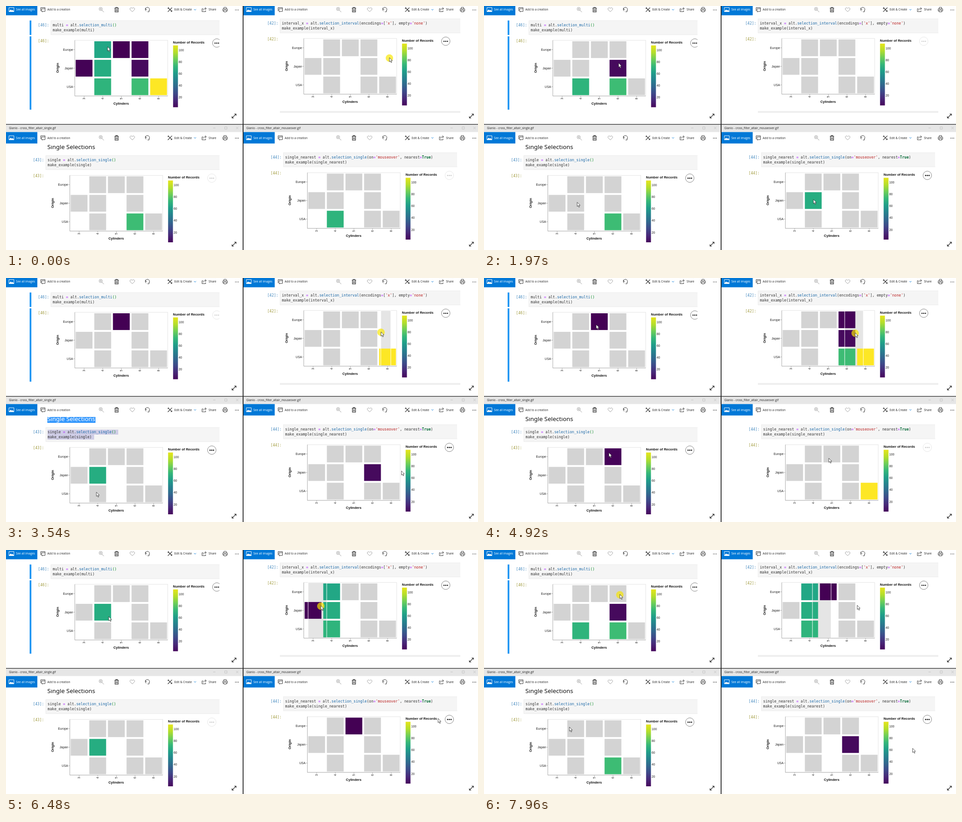
Write an HTML page that moves like this. It is 1039x539 px and loops after 8 s.

```html
<!DOCTYPE html>
<html lang="en">
<head>
<meta charset="utf-8">
<title>Chart selections</title>
<style>
html, body { margin: 0; width: 100%; height: 100%; overflow: hidden; background: #fff; }
svg { display: block; width: 1039px; height: 539px; }
text { white-space: pre; }
.ui { font: 6.35px "Open Sans", "Noto Sans", sans-serif; fill: #222; }
.code { font: 8.07px "DejaVu Sans Mono", monospace; fill: #333; }
.label { font: 6.8px "Liberation Sans", sans-serif; fill: #222; }
.name { font: bold 7.48px "Liberation Sans", sans-serif; fill: #111; }
.head { font: 13.4px "Noto Sans", "Open Sans", sans-serif; fill: #111; }
.icon { fill: none; stroke: #333; stroke-width: .95; }
.pale { stroke: #999; }
.axis { stroke: #999; stroke-width: .75; }
</style>
</head>
<body>
<svg id="stage" viewBox="0 0 1039 539">
  <defs>
    <linearGradient id="scale" x1="0" y1="1" x2="0" y2="0"></linearGradient>
    <clipPath id="pane"><rect width="470" height="260"/></clipPath>
    <clipPath id="page"><rect y="307" width="520" height="232"/></clipPath>
  </defs>
</svg>
<script>
const LOOP = 8000, STEP = 41, GREY = '#d3d3d3';
const stage = document.getElementById('stage');

function el(tag, attrs, parent = stage, content) {
  const node = document.createElementNS('http://www.w3.org/2000/svg', tag);
  for (const k in attrs) node.setAttribute(k, attrs[k]);
  if (content !== undefined) node.textContent = content;
  parent.appendChild(node);
  return node;
}
const rect = (x, y, width, height, fill, parent) => el('rect', { x, y, width, height, fill }, parent);
const text = (cls, x, y, str, parent, more) => el('text', { class: cls, x, y, ...more }, parent, str);
const icon = (d, parent, style = '', cls = 'icon') => el('path', { class: cls, d, style }, parent);
const dots = (x, y, gap, r, parent) =>
  [-gap, 0, gap].forEach(dx => el('circle', { cx: x + dx, cy: y, r, fill: '#111' }, parent));

'#46085c #482878 #3e4989 #31688e #26828e #1f9e89 #35b779 #6ece58 #b5de2b #e6e41c'.split(' ')
  .forEach((c, i) => el('stop', { offset: i / 9, 'stop-color': c }, document.getElementById('scale')));

// ---- window chrome ----
function toolbar(x, y) {
  const g = el('g', { transform: `translate(${x} ${y})` });
  rect(0, -12.7, 69, 25.2, '#0078d7', g);
  icon('M6.5 -4.5h11v9h-11Z', g, 'stroke:#fff');
  icon('M6.5 4l4 -4.5l2 2.5l2 -1.5l3 3.5Z', g, 'fill:#fff;stroke:none');
  text('ui', 22, 2.4, 'See all images', g, { style: 'fill:#fff' });
  icon('M76.5 3v-7.5h9.5v2.5h-7.5v6h7.5v-6M80 4v1.5', g);
  text('ui', 91, 2.4, 'Add to a creation', g);
  el('circle', { class: 'icon pale', cx: 208.5, cy: -1.5, r: 3.5 }, g);
  icon('M211 1.2l4.5 4.3M206.8 -1.5h3.4m-1.7 -1.7v3.4', g, '', 'icon pale');
  icon('M239 -3.3h9M241.7 -3.5v-1.5h3.6v1.5M240 -3v8.2h7v-8.2M242.3 -1v4.4m2.4 0v-4.4', g, 'stroke-width:1.2');
  icon('M278 4.8l-4.7 -4.8c-1.8 -2.4 1.7 -6.3 4.7 -2.8c3 -3.5 6.5 .4 4.7 2.8Z', g, '', 'icon pale');
  icon('M308.5 3.2A4.6 4.6 0 1 1 314.8 2.6M311.5 4.8h3.5v-3.6M307 -4v3.5h3', g);
  icon('M356.5 -4.5l9 9m0 -9l-9.3 9.3M356 -2l2.5 -2.5M363 4.5l2.8 -2.5', g, 'stroke-width:1.2');
  text('ui', 370.5, 2.4, 'Edit & Create', g);
  icon('M414 -1l2.2 2.2l2.2 -2.2', g, 'stroke:#0078d7');
  icon('M434 -2h-2.5v6.5h8v-2.5M434 2c0 -3 2 -4.3 6.5 -4.3M438 -5l3 2.7l-3 2.6', g);
  text('ui', 446, 2.4, 'Share', g);
  icon('M479.5 -1.5v-3.5h5.5v3.5M479.5 3h-2.2v-4.5h10v4.5h-2.3M479.5 1h5.5v4h-5.5Z', g);
  dots(508.3, .7, 3.2, .8, g);
}
function titleBar(x, file) {
  rect(x, 262, 522, 16.4, '#e6e6e6');
  text('ui', x + 6.5, 272, 'Glanio - ' + file);
  icon(`M${x + 456} 269.5h5m20.5 -2.5h5v5h-5zm25 0l5 5m0 -5l-5 5`, stage, 'stroke:#c2c2c2');
}
rect(0, 0, 1039, 539, '#fff');
titleBar(0, 'cross_filter_altair_single.gif');
titleBar(522.5, 'cross_filter_altair_mouseover.gif');
for (const x of [0, 522.5]) {
  for (const y of [8, 291.2]) toolbar(x, y);
  for (const y of [243, 526]) {
    icon(`M${x + 497.5} ${y + 4.5}l9 -9m-4 0h4v4m-9 1v4h4`, stage, 'stroke:#222;stroke-width:1.1');
  }
}

// ---- notebook cells ----
const TOKENS = [[/^'/, 'fill:#ba2121'], [/^=/, 'fill:#a2f'], [/^sel/, 'fill:#1766a6'],
  [/^True/, 'fill:#063;font-weight:bold'], [/^\(\)$/, 'fill:#0a8a2a']];

function codeLine(x, y, str) {
  const line = text('code', x, y, '');
  for (const part of str.split(/('[^']*'|=|selection_\w+|True|\(\)$)/)) {
    const hit = TOKENS.find(s => s[0].test(part));
    el('tspan', hit ? { style: hit[1] } : {}, line, part);
  }
}
function notebook(x, y, w, n, gap, lines, mark) {
  rect(x, y, w, 31.8, '#f5f5f5');
  icon(`M${x + w} ${y + .3}h${.3 - w}v31.2h${w}`, stage, 'stroke:#e4e4e4;stroke-width:.6');
  if (mark) mark();
  text('code', x - 28, y + 13, `[${n}]:`, stage, { style: 'fill:#3f86bd' });
  text('code', x - 28, y + 13 + gap, `[${n}]:`, stage, { style: 'fill:#a09a3c' });
  lines.forEach((s, i) => codeLine(x + 4.2, y + 13 + i * 11.4, s));
}
const marked = el('g', { 'clip-path': 'url(#page)' });
rect(52, 32, 3.8, 32, '#2196f3');
rect(52, 67, 3.8, 162, '#2196f3');
notebook(98.6, 32, 371.4, 46, 35, ['multi = alt.selection_multi()', 'make_example(multi)']);
notebook(603, 28, 397, 42, 35, ["interval_x = alt.selection_interval(encodings=['x'], empty='none')", 'make_example(interval_x)']);
rect(603, 232, 397, 4, '#eee');
notebook(87.4, 330, 382.6, 43, 35.2, ['single = alt.selection_single()', 'make_example(single)'], () => {
  stage.appendChild(marked);
  rect(91, 304, 106, 16, '#3297fd', marked);
  rect(91.5, 335, 155.5, 11, '#cfcde6', marked);
  rect(91.5, 346, 102.5, 11, '#cfcde6', marked);
});
const heading = text('head', 91, 316.3, 'Single Selections', el('g', { 'clip-path': 'url(#page)' }));
notebook(610.4, 323.7, 382.6, 44, 35.6, ["single_nearest = alt.selection_single(on='mouseover', nearest=True)", 'make_example(single_nearest)']);

// ---- charts: the letter gives the row, the digit the column ----
const FILLS = {
  E4: '#22a785', E5: '#440154', E6: '#450358', J3: '#440256', J4: '#26ad81',
  J6: '#460a5d', U4: '#2fb47c', U6: '#3dbc74', U8: '#fde725'
};
const KEYS = Object.keys(FILLS);
const colOf = k => '34568'.indexOf(k[1]);
const rowOf = k => 'EJU'.indexOf(k[0]);

function chart(X, Y, clip) {
  const g = el('g', { transform: `translate(${X} ${Y})` }, el('g', clip ? { 'clip-path': clip } : {}));
  el('rect', { width: 204.5, height: 123, fill: 'none', stroke: '#ddd', 'stroke-width': .8 }, g);
  const band = rect(0, 0, 0, 123, '#e5e5e5', g);
  const cells = {};
  for (const k of KEYS) cells[k] = rect(1.9 + colOf(k) * STEP, 2.1 + rowOf(k) * STEP, 37, 37, GREY, g);
  const edge = rect(0, 0, 0, 123, 'none', g);
  edge.setAttribute('stroke', '#fff');
  icon('M0 0v123h204.5', g, '', 'icon axis');
  ['Europe', 'Japan', 'USA'].forEach((s, i) => {
    const y = 20.5 + i * STEP;
    icon(`M-3.4 ${y}h3.4`, g, '', 'icon axis');
    text('label', -4, y + 2.3, s, g, { 'text-anchor': 'end' });
  });
  [...'34568'].forEach((s, i) => {
    const x = 20.5 + i * STEP;
    icon(`M${x} 123v3.4`, g, '', 'icon axis');
    text('label', 0, 0, s, g, { 'text-anchor': 'end', transform: `translate(${x + 2.2} 127) rotate(-90)` });
  });
  text('name', 102, 142.2, 'Cylinders', g, { 'text-anchor': 'middle' });
  text('name', 0, 0, 'Origin', g, { 'text-anchor': 'middle', transform: 'translate(-36 61) rotate(-90)' });
  text('name', 216, 6.8, 'Number of Records', g);
  rect(216.3, 11.3, 10.7, 136.5, 'url(#scale)', g);
  for (let i = 0; i < 5; i++) text('label', 228.6, 24 + i * 26.1, 100 - i * 20, g);
  const menu = el('g', {}, g);
  el('circle', { cx: 312.5, cy: 6, r: 9.4, fill: '#fff', stroke: '#777', 'stroke-width': .9 }, menu);
  dots(312.5, 6.2, 3.8, 1.35, menu);
  return { X, Y, cells, band, edge, menu };
}
function pointer() {
  const body = el('g', {});
  const glow = el('circle', { cy: 1, r: 8.2, fill: '#f7e600', 'fill-opacity': .68 }, body);
  el('path', { d: 'M0 0v9.3l2.1 -1.9l1.6 3.6l1.6 -.7l-1.6 -3.5h2.9Z', fill: '#fff', stroke: '#222', 'stroke-width': .75 }, body);
  return { body, glow };
}

// ---- motion ----
const multi = chart(151.5, 75.8, 'url(#pane)');
const interval = chart(655.5, 71.8);
const single = chart(140.5, 374.2);
const nearest = chart(663.4, 368.2);
rect(521, 0, 1.7, 539, '#111');
rect(0, 260.8, 1039, 1.3, '#222');

const ease = u => u * u * (3 - 2 * u);

function along(keys, t) {
  const i = keys.findIndex(k => k[0] > t);
  if (i === 0) return null;
  if (i < 0) return keys[keys.length - 1].slice(1);
  const a = keys[i - 1], b = keys[i], s = ease((t - a[0]) / (b[0] - a[0]));
  return [a[1] + (b[1] - a[1]) * s, a[2] + (b[2] - a[2]) * s];
}

// picks: "time:cells"; away: hidden stretch of the pointer; dim: stretch with a faded menu.
// The pointer passes through its stops and through each cell it picks.
function animate(c, picks, away, dim, clicks, stops) {
  c.picks = picks.split(' ').filter(Boolean).map(s => {
    const [t, keys] = s.split(':');
    return { t: +t, keys: keys === 'all' ? KEYS : keys.split('+') };
  });
  const isAway = t => away.some(([a, b]) => t >= a && t < b);
  const hits = c.picks.filter(p => p.t > 0 && p.keys !== KEYS && !isAway(p.t));
  const visits = hits.map(p => {
    const k = p.keys[p.keys.length - 1];
    return [p.t, c.X + colOf(k) * STEP + 21, c.Y + rowOf(k) * STEP + 18];
  });
  c.path = stops.concat(visits).sort((a, b) => a[0] - b[0]);
  c.isAway = isAway;
  c.isDim = t => dim.some(([a, b]) => t >= a && t < b);
  c.isPressed = clicks || (t => hits.some(p => Math.abs(t - p.t) < 70));
  Object.assign(c, pointer());
}

animate(multi,
  '0:all 250:E4 620:J4 1000:U4 1450:U4+U6 1850:U4+U6+J6 2290:U4+U6+J6+E6 3000:E5 ' +
  '5450:all 5980:E4 6350:J4 6730:U4 7180:U4+U6 7580:U4+U6+J6',
  [[2600, 4250]], [[3000, 4250]],
  t => t > 7900 || multi.picks.some(p => p.t > 0 && Math.abs(t - p.t) < 70),
  [[0, 223.5, 90], [1260, 298.5, 183], [2230, 299, 98], [2600, 420, 66], [4250, 330, 150],
    [4920, 247, 103], [5730, 223.5, 90], [6480, 226, 147], [7960, 299, 98]]);

animate(interval, '', [[950, 2300]], [[1000, 2300]],
  t => t < 140 || (t > 3250 && t < 7350 && Math.abs(t - 4170) > 120),
  [[0, 844, 114], [950, 850, 118], [2300, 880, 110], [2670, 847.5, 118], [3250, 847, 119], [3540, 825.5, 119],
    [4000, 806, 120], [4300, 829, 121], [4920, 817, 121], [6480, 693, 123], [7250, 751, 123], [7960, 821.5, 122]]);

animate(single, '0:U6 2050:J4 4420:J3 4750:E6 5600:J4 7100:U6',
  [[0, 900], [6150, 7150]], [[0, 900], [6150, 7100]], null,
  [[900, 330, 470], [1260, 296, 444], [2670, 300, 436], [3100, 60, 490], [3540, 199, 473],
    [4920, 275, 386], [6150, 300, 470], [7150, 285, 475], [7960, 188, 391]]);

animate(nearest, '0:U4 900:E5 1600:E4 1950:J4 2350:J3 2850:J4 3200:J6 3950:U8 5300:E5 6850:E6 7200:J6',
  [[0, 600], [4350, 4800]], [[0, 600], [4500, 5300]], () => false,
  [[600, 765, 480], [1260, 751, 403], [2670, 667, 411], [3540, 870.5, 426], [4350, 880, 480],
    [4800, 759, 399], [4920, 759, 398], [6480, 951, 372], [7960, 943.5, 438]]);

// left and right edge of the dragged interval
const brush = [[3250, 847, 847], [3540, 825, 847], [4000, 806, 847], [4300, 806, 847],
  [4920, 794, 835], [6480, 665, 706], [7250, 723, 764]];

const show = (node, on) => node.setAttribute('display', on ? 'inline' : 'none');

function drawChart(c, t) {
  const span = c === interval ? along(brush, t) : null;
  const pick = c.picks.filter(p => p.t <= t).pop();
  for (const k of KEYS) {
    const left = c.X + colOf(k) * STEP;
    const on = span ? span[0] < left + STEP && span[1] > left : pick && pick.keys.includes(k);
    c.cells[k].setAttribute('fill', on ? FILLS[k] : GREY);
  }
  for (const r of [c.band, c.edge]) {
    show(r, span);
    if (!span) continue;
    r.setAttribute('x', span[0] - c.X);
    r.setAttribute('width', span[1] - span[0]);
  }
  c.menu.setAttribute('opacity', c.isDim(t) ? .2 : 1);
  const p = c.isAway(t) ? null : along(c.path, t);
  show(c.body, p);
  if (p) c.body.setAttribute('transform', `translate(${p[0]} ${p[1]})`);
  show(c.glow, c.isPressed(t));
}

function draw(t) {
  for (const c of [multi, interval, single, nearest]) drawChart(c, t);
  const lit = t >= 3300 && t < 4150;
  show(marked, lit);
  heading.style.fill = lit ? '#fff' : '#111';
}

const start = performance.now();
function tick() {
  draw((performance.now() - start) % LOOP);
  requestAnimationFrame(tick);
}
draw(0);
requestAnimationFrame(tick);
</script>
</body>
</html>
```
